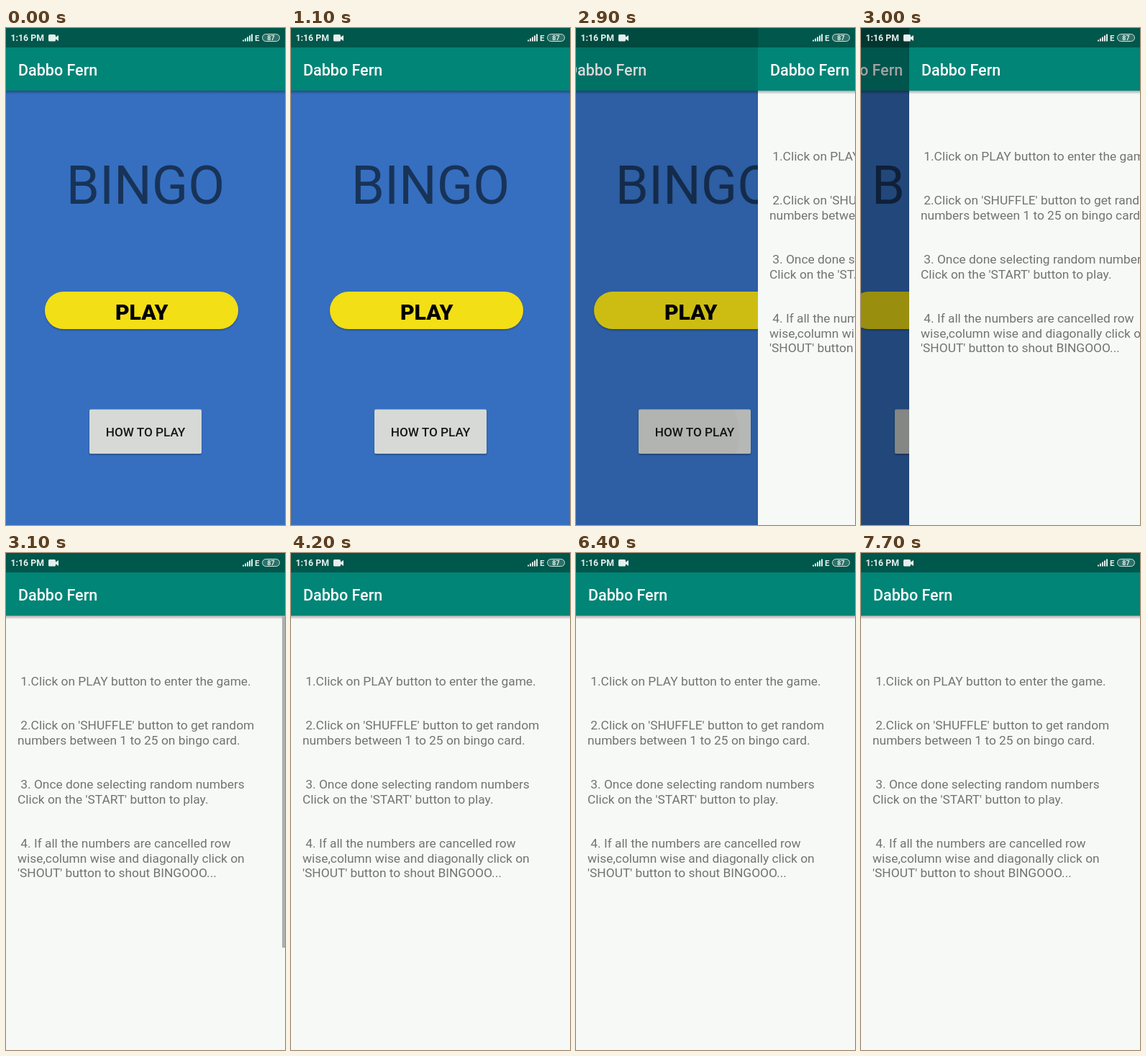
An HTML page that plays this animation: 388 by 690 pixels, repeating every 8 s.

```html
<!DOCTYPE html>
<html lang="en">
<head>
<meta charset="utf-8">
<title>Bingo game</title>
<style>
  html, body { margin: 0; width: 100%; height: 100%; overflow: hidden; }
  svg { display: block; width: 100vw; height: 100vh; }
  text { font-family: Roboto, sans-serif; white-space: pre; }
  .medium { font-weight: 500; }
  .bold { font-weight: 700; }
  .mid { text-anchor: middle; }
</style>
</head>
<body>
<svg viewBox="0 0 388 690">
  <defs>
    <linearGradient id="fade" x2="0" y2="1">
      <stop offset="0" stop-opacity=".32"/>
      <stop offset="1" stop-opacity="0"/>
    </linearGradient>
    <filter id="lift" x="-10%" y="-20%" width="120%" height="150%">
      <feDropShadow dx="0" dy="1.6" stdDeviation="1.3" flood-opacity=".3"/>
    </filter>
    <clipPath id="buttonClip"><rect x="116" y="529.5" width="156" height="61.5" rx="2"/></clipPath>
    <g id="appBar">
      <rect y="87" width="388" height="5" fill="url(#fade)"/>
      <rect width="388" height="87" fill="#008577"/>
      <rect width="388" height="27" fill="#00574b"/>
      <text class="medium" x="17" y="66" font-size="21.5" fill="#fff">Dabbo Fern</text>
    </g>
  </defs>

  <g id="home">
    <rect width="388" height="690" fill="#366fc0"/>
    <use href="#appBar"/>
    <text class="mid" x="194" y="244" font-size="74" fill-opacity=".54">BINGO</text>
    <rect x="54" y="366" width="269" height="52" rx="26" fill="#f2df12" filter="url(#lift)"/>
    <text class="mid" x="188.7" y="404.5" font-size="30.2" font-weight="900">PLAY</text>
    <rect x="116" y="529.5" width="156" height="61.5" rx="2" fill="#d6d9d6" filter="url(#lift)"/>
    <circle id="ripple" cx="172" cy="563" clip-path="url(#buttonClip)"/>
    <text class="medium mid" x="194" y="566.5" font-size="17.2" fill="#161716">HOW TO PLAY</text>
  </g>
  <rect id="dim" width="388" height="690"/>

  <g id="help">
    <rect width="388" height="690" fill="#f7f9f7"/>
    <use href="#appBar"/>
    <g id="rules" font-size="17.35" fill="#727372"></g>
    <rect id="scrollbar" x="384" y="87" width="4" height="461" fill="#adb0ae"/>
  </g>

  <g fill="#e6efed">
    <text class="bold" x="6.5" y="18" font-size="12.3">1:16 PM</text>
    <rect x="59" y="9" width="10" height="9.5" rx="1.5"/>
    <path d="M68.5 13 73 10V18L68.5 15Z"/>
    <g id="signal"></g>
    <text class="bold" x="346" y="18" font-size="11.5">E</text>
    <rect x="356.5" y="8.5" width="24" height="10" rx="5" fill="#6f9a93" fill-opacity=".4" stroke="#d5e2e0"/>
    <text class="bold mid" x="368.5" y="17" font-size="9">87</text>
  </g>
</svg>
<script>
  const LOOP = 8000, STEP = 100, WIDTH = 388;
  const byId = id => document.getElementById(id);
  const clamp = v => Math.max(0, Math.min(1, v));
  const moveTo = (id, x) => byId(id).setAttribute('transform', `translate(${Math.round(x)})`);

  function add(parent, tag, attrs, content = '') {
    const node = document.createElementNS('http://www.w3.org/2000/svg', tag);
    for (const key in attrs) node.setAttribute(key, attrs[key]);
    node.textContent = content;
    byId(parent).append(node);
  }

  // Empty entries are blank lines.
  [
    ' 1.Click on PLAY button to enter the game.', '', '',
    " 2.Click on 'SHUFFLE' button to get random",
    'numbers between 1 to 25 on bingo card.', '', '',
    ' 3. Once done selecting random numbers',
    "Click on the 'START' button to play.", '', '',
    ' 4. If all the numbers are cancelled row',
    'wise,column wise and diagonally click on',
    "'SHOUT' button to shout BINGOOO..."
  ].forEach((line, i) => line && add('rules', 'text', { x: 16, y: 184 + i * 20.48 }, line));

  for (let i = 0; i < 5; i++) {
    const height = 2 + i * 2;
    add('signal', 'rect', { x: 329 + i * 3, y: 18.5 - height, width: 2, height });
  }

  function render(time) {
    const t = Math.floor(time / STEP) * STEP;
    const slide = 1 - (1 - clamp((t - 2850) / 250)) ** 1.917;
    const spread = clamp((t - 2800) / 100);
    moveTo('home', -83 * slide);
    moveTo('help', WIDTH * (1 - slide));
    byId('dim').setAttribute('fill-opacity', slide * 0.44);
    byId('ripple').setAttribute('r', t < 2800 ? 0 : 17 + spread * 67);
    byId('ripple').setAttribute('fill-opacity', 0.07 - spread * 0.045);
    byId('scrollbar').setAttribute('opacity', 1 - clamp((t - 3950) / 250));
  }

  const start = performance.now();
  function tick() {
    render((performance.now() - start) % LOOP);
    requestAnimationFrame(tick);
  }
  tick();
</script>
</body>
</html>
```
